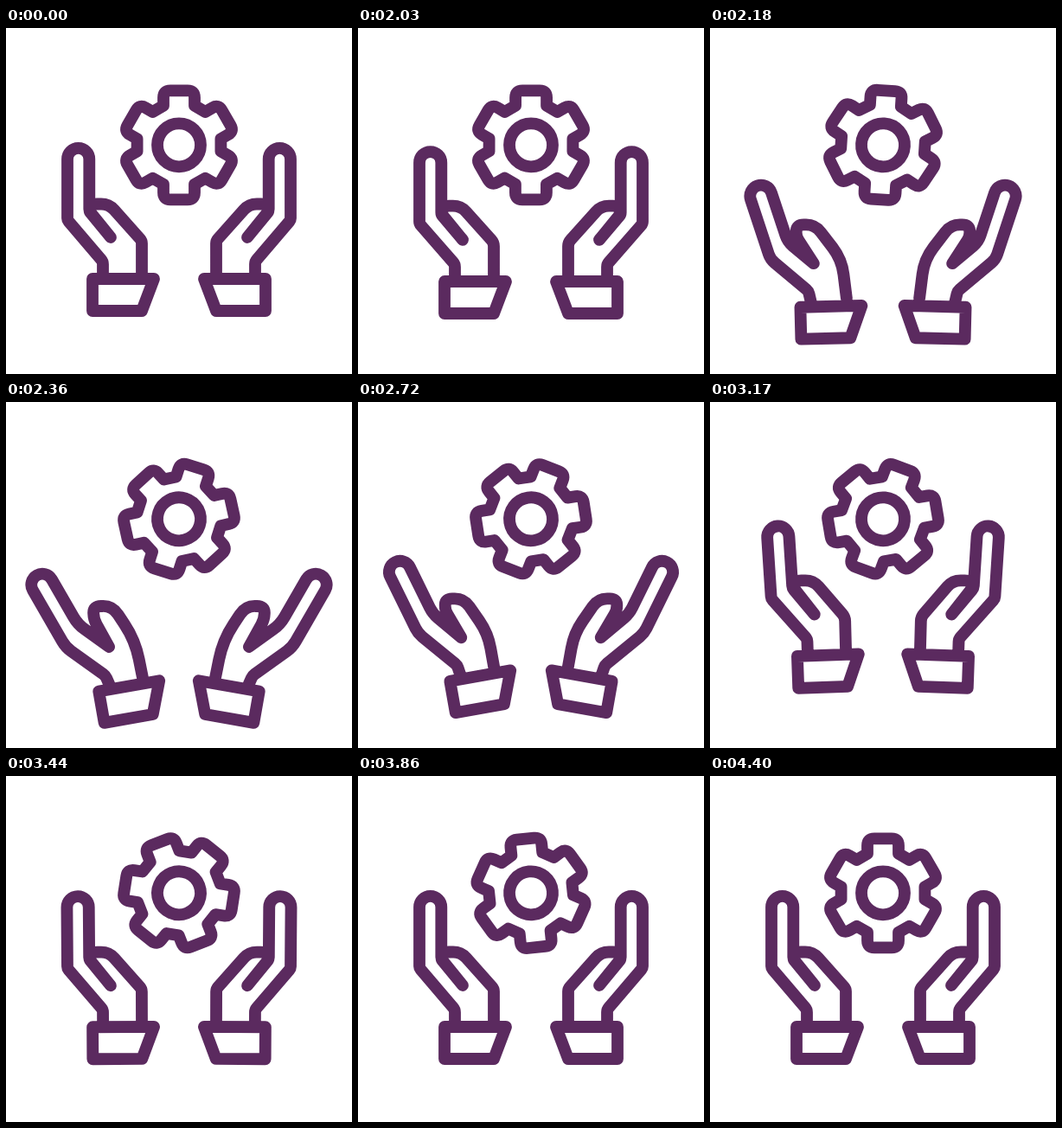
An HTML page that plays this animation: 400 by 400 pixels, repeating every 4.46 s.

```html
<!DOCTYPE html>
<html lang="en">
<head>
<meta charset="utf-8">
<title>Hands and gear</title>
<style>
  html, body { margin: 0; width: 100%; height: 100%; overflow: hidden; background: #fff; }
  svg { display: block; width: 100vw; height: 100vh; }
  .ink { fill: none; stroke: #5b2a5f; stroke-width: 13.8; stroke-linecap: round; stroke-linejoin: round; }
</style>
</head>
<body>
<svg viewBox="0 0 400 400">
  <g class="ink">
    <g id="gear"><path id="teeth"/><circle r="25"/></g>
    <path id="left"/>
    <path id="right" transform="matrix(-1 0 0 1 400 0)"/>
  </g>
</svg>
<script>
const LOOP = 4460, START = 2030, STEP = 30, LAST = 4400;
const RAD = Math.PI / 180;
const $ = id => document.getElementById(id);
const mix = (a, b, k) => a + (b - a) * k;
const xy = p => p[0].toFixed(2) + ' ' + p[1].toFixed(2);

// Cubic timing curve with control points (a, 0) and (b, 1)
function ease(u, a, b) {
  if (u <= 0) return 0;
  if (u >= 1) return 1;
  let lo = 0, hi = 1, s;
  for (let i = 0; i < 24; i++) {
    s = (lo + hi) / 2;
    const q = 1 - s;
    if (3 * a * s * q * q + 3 * b * s * s * q + s * s * s < u) lo = s; else hi = s;
  }
  return s * s * (3 - 2 * s);
}

// Point (x, y) in a frame at origin o, turned by deg
function local(o, deg, x, y) {
  const c = Math.cos(deg * RAD), s = Math.sin(deg * RAD);
  return [o[0] + x * c - y * s, o[1] + x * s + y * c];
}

function toward(p, q, d) {
  const len = Math.hypot(q[0] - p[0], q[1] - p[1]) || 1;
  const k = Math.min(d / len, .5);
  return [mix(p[0], q[0], k), mix(p[1], q[1], k)];
}

// Open polyline whose inner corners are cut by the given distances
function bendy(pts, cuts, head = 'M') {
  let d = head + xy(pts[0]);
  for (let i = 1; i < pts.length - 1; i++) {
    const c = cuts[i - 1];
    d += 'L' + xy(toward(pts[i], pts[i - 1], c)) + 'Q' + xy(pts[i]) + ' ' + xy(toward(pts[i], pts[i + 1], c));
  }
  return d + 'L' + xy(pts[pts.length - 1]);
}

function gearPath() {
  let d = '';
  for (let i = 0; i < 6; i++) {
    const at = (x, y) => local([0, 0], i * 60, x, y);
    d += bendy([at(-18, -45.5), at(-18, -63), at(18, -63), at(18, -45.5)], [8, 8], i ? 'L' : 'M');
  }
  return d + 'Z';
}

// How far the hands are open; the turning parts run late behind the drop
function openness(t, late) {
  return t < 2450 ? ease((t - 2000 - late) / (450 - late), .15, .2)
                  : 1 - ease((t - 2450 - late) / 1100, .35, .2);
}

function handPath(t) {
  const drop = openness(t, 0), sway = openness(t, 60), tilt = -10.5 * openness(t, 150);
  const move = (x, y, dx, dy) => [x + dx * sway, y + dy * drop];

  const wrist = move(112, 286, 7.5, 41), heel = move(112, 270, 3, 47.5), bend = move(71, 222, -2, 63);
  const lean = -31 * sway;
  const tipL = local(bend, lean, 0, -70.5 - 6 * drop ** 3);
  const tipR = local(tipL, lean, 25.3, 0);
  const web = local(tipR, lean, 0, 60);
  const crease = move(121, 242, -2, 42);

  const root = move(96.5, 212, 5, 40), tip = move(99, 203.5, 2, 33.5), top = move(119, 203.5, 4, 33);
  const knuckle = move(157, 246, -8, 30), inner = move(157, 288, 1.5, 34);

  const cuff = move(100, 290, 7.5, 45.5);
  const sleeve = [[0, 0], [71, 0], [57, 37], [0, 37]].map(([x, y]) => xy(local(cuff, tilt, x, y)));

  return bendy([wrist, heel, bend, tipL], [3, 2 + 6 * drop]) +
    'A1 1 0 0 1 ' + xy(tipR) +
    bendy([tipR, web, crease], [2 + 8 * drop], 'L') +
    bendy([crease, root, tip, top, knuckle, inner], [1 + 6 * drop, 6 + 3 * drop, 9 + 3 * drop, 3 + 20 * drop]) +
    'M' + sleeve.join('L') + 'Z';
}

function draw(time) {
  let t = time % LOOP;
  t = t < START ? 0 : Math.min(LAST, START + Math.floor((t - START) / STEP) * STEP);
  const turn = 180 * ease((t - 2000) / 2430, .33, .18);
  $('gear').setAttribute('transform', `translate(200 135.3) rotate(${turn.toFixed(2)})`);
  const d = handPath(t);
  $('left').setAttribute('d', d);
  $('right').setAttribute('d', d);
}

$('teeth').setAttribute('d', gearPath());
const begin = performance.now();
function tick() {
  draw(performance.now() - begin);
  requestAnimationFrame(tick);
}
tick();
</script>
</body>
</html>
```
